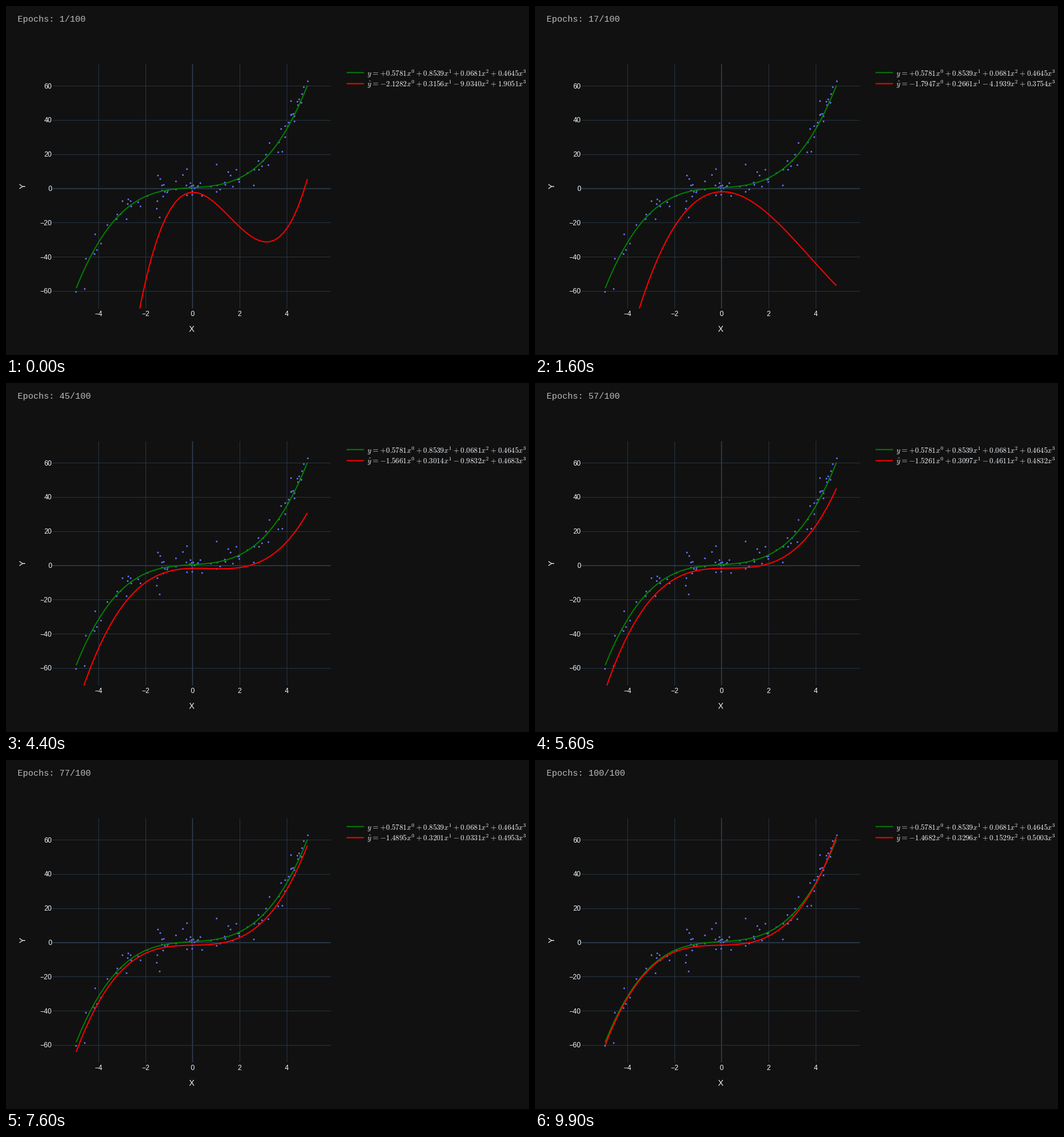
Write a matplotlib script that moves like this. It is 900 px wide and 600 px high and loops after 10000 ms.

```python
import matplotlib.pyplot as plt
import numpy as np
from matplotlib.animation import FuncAnimation
from matplotlib.patches import Rectangle

EPOCHS = 100
W, H, DPI = 900, 600, 100
PT = 72 / DPI  # points per pixel
LEFT, RIGHT, TOP, BOTTOM = 80, 559, 100, 520
X0, Y0, SX, SY = 321.1, 314, 40.48, 2.9375
X_MIN, X_MAX = -4.95, 4.88
BG, GRID, INK, DOT = "#111111", "#283442", "#f2f5fa", "#636efa"
GREEN, RED = "#008000", "#ff0000"
TRUE_W = np.array([0.5781, 0.8539, 0.0681, 0.4645])

# Gradient descent in closed form: a slow drift plus two decaying modes
BASE = np.array([-1.4986, 0.29585, 0.2556, 0.5051])
DRIFT = np.array([3.76e-4, 3.49e-4, -2.5e-5, -1.92e-5])
MID = np.array([-0.6276, -0.07339, -9.2425, -0.2687])
FAST = np.array([-0.0020, 0.09314, -0.0471, 1.6687])


def weights(n):
    return BASE + DRIFT * n + MID * np.exp(-0.045695 * n) + FAST * 0.185 ** n


def px(x):
    return X0 + SX * np.asarray(x)


def py(y):
    return Y0 - SY * np.asarray(y)


def poly(w, x):
    return np.polyval(w[::-1], x)


def formula(name, w, plus=False):
    """Polynomial as mathtext, with TeX's spacing around = and binary signs."""
    terms = []
    for i, c in enumerate(w):
        sign = "-" if c < 0 else "+"
        if i:
            sign = rf"\hspace{{0.02}}{sign}\hspace{{0.02}}"
        else:
            sign = f"{{{sign}}}" if c < 0 or plus else ""
        terms.append(f"{sign}{abs(c):.4f}x^{i}")
    return rf"${name}\hspace{{0.08}}=\hspace{{0.08}}{''.join(terms)}$"


# Noisy samples of the true curve, with a few strong outliers
rng = np.random.default_rng(4)
noisy_x = rng.uniform(X_MIN, X_MAX, 84)
noisy_y = poly(TRUE_W, noisy_x) + rng.normal(0, 3.5, noisy_x.size)
outliers = np.array([
    (-4.96, -60.1), (-4.6, -58.5), (-3, -7.2), (-1.49, 7.8), (-1.42, -16.7),
    (-0.25, 11.5), (1.01, 14.3), (1.5, 9.8), (2.6, 2), (3.22, 13.8),
    (3.26, 26.9), (3.8, 21.8), (4.18, 51.4), (4.88, 62.9),
])
sample_x = np.append(noisy_x, outliers[:, 0])
sample_y = np.append(noisy_y, outliers[:, 1])

fig = plt.figure(figsize=(W / DPI, H / DPI), dpi=DPI, facecolor=BG)
ax = fig.add_axes([0, 0, 1, 1])
ax.set(xlim=(0, W), ylim=(H, 0))
ax.axis("off")


def line(xs, ys, color, width, z):
    return ax.plot(xs, ys, color=color, lw=width * PT, zorder=z, snap=False,
                   solid_capstyle="butt", solid_joinstyle="round")[0]


def label(x, y, s, size, color=INK, font="Liberation Sans", **kw):
    return ax.text(x, y, s, fontsize=size * PT, color=color, family=font,
                   **{"va": "baseline", **kw})


def grid_line(pos, value):
    """Pixel-aligned centre and width; the zero line is two pixels wide."""
    return (np.floor(pos) + 0.5, 1) if value else (np.floor(pos), 2)


for v in range(-4, 5, 2):
    x, width = grid_line(px(v), v)
    line([x, x], [TOP, BOTTOM], GRID, width, 1)
    label(px(v), 533, f"{v}".replace("-", "−"), 12, ha="center")
for v in range(-60, 61, 20):
    y, width = grid_line(py(v), v)
    line([LEFT, RIGHT], [y, y], GRID, width, 1)
    label(79, py(v) + 4, f"{v}".replace("-", "−"), 12, ha="right")

label(319.5, 560, "X", 14, ha="center")
label(30, 309.5, "Y", 14, ha="center", va="center", rotation=90)

ax.plot(px(sample_x), py(sample_y), ls="", marker="o", ms=3 * PT, mew=0,
        color=DOT, zorder=2, snap=False)

curve_x = np.linspace(X_MIN, X_MAX, 50)
line(px(curve_x), py(poly(TRUE_W, curve_x)), GREEN, 2, 3)
fit_line = line(px(curve_x), py(poly(weights(0), curve_x)), RED, 2, 4)
fit_line.set_clip_path(Rectangle((LEFT, TOP), RIGHT - LEFT, BOTTOM - TOP,
                                 transform=ax.transData))

for y, color in ((114.5, GREEN), (133.5, RED)):
    line([586, 616], [y, y], color, 2, 3)
label(621, 121, formula("y", TRUE_W, plus=True), 12.85, math_fontfamily="cm")
fit_text = label(621, 139, "", 12.85, math_fontfamily="cm")
title = label(20, 27.5, "", 15, color="#b8bbc0", font="Liberation Mono")


def update(i):
    w = weights(i)
    fit_line.set_ydata(py(poly(w, curve_x)))
    fit_text.set_text(formula(r"\hat{y}", w))
    title.set_text(f"Epochs: {i + 1}/{EPOCHS}")
    return fit_line, fit_text, title


anim = FuncAnimation(fig, update, frames=EPOCHS, interval=100, repeat=True,
                     repeat_delay=0, blit=False)
plt.show()
```
